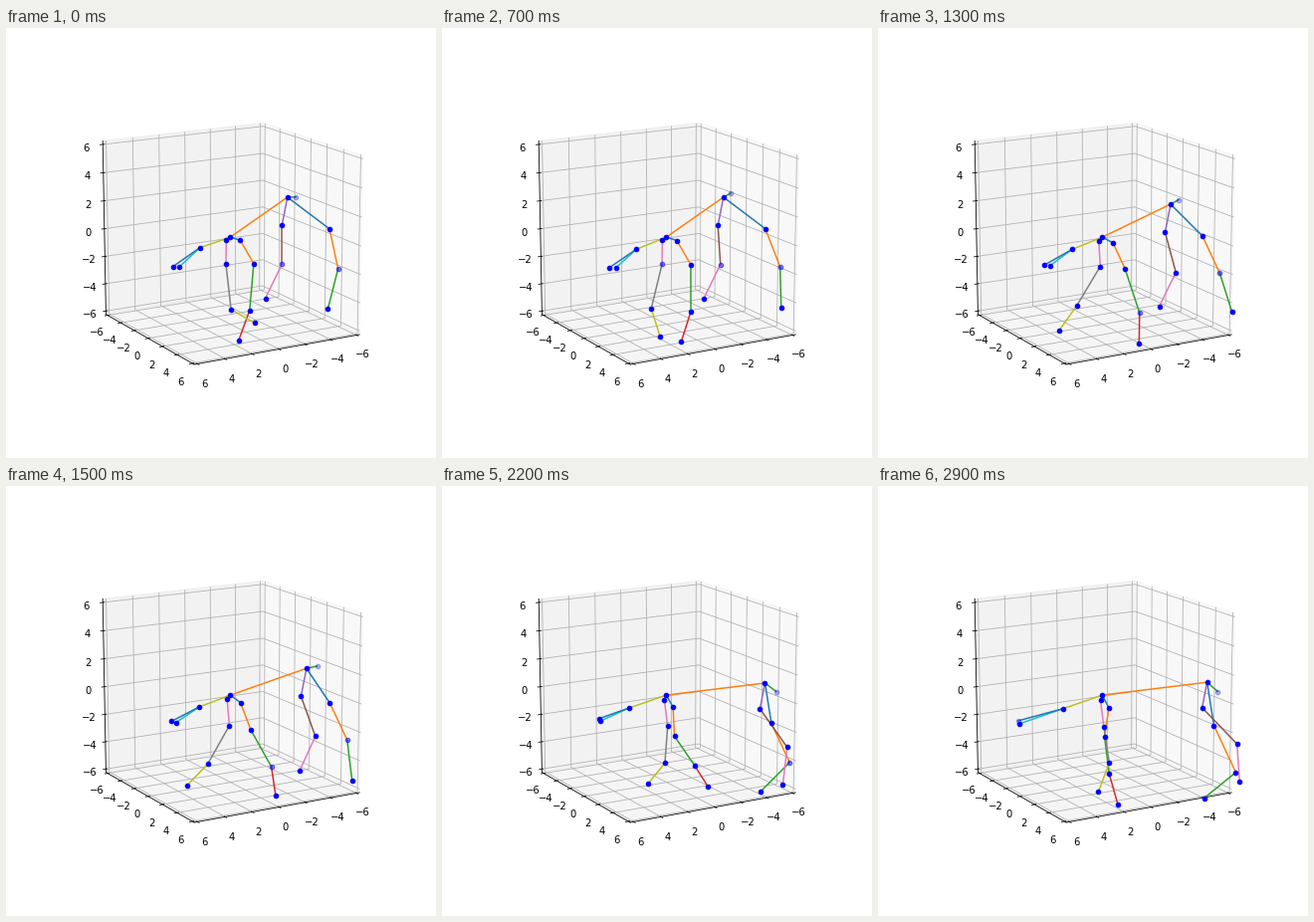
Animation, 432 px wide and 432 px high, one loop 3000 ms. Source, as a matplotlib script:

```python
import numpy as np
import matplotlib.pyplot as plt
from matplotlib.animation import FuncAnimation
from mpl_toolkits.mplot3d import proj3d

SIZE = 432
FRAMES = 30
STEP = np.arange(FRAMES)
LIM = 6.25


def ease(start, end, first, last):
    """Smooth change from start to end between two steps."""
    u = np.clip((STEP - first) / (last - first), 0, 1)
    return start + (end - start) * u * u * (3 - 2 * u)


def pulse(height, center, width):
    return height * np.exp(-0.5 * ((STEP - center) / width) ** 2)


class Bone:
    """Limb part hung from a parent; angle in degrees from straight down."""

    def __init__(self, parent, color, angle, length, behind=None):
        self.parent, self.color, self.behind = parent, color, behind
        self.leaf = True
        parent.leaf = False
        turn = np.radians(angle + 0 * STEP)
        self.path = parent.path + np.column_stack(
            [length * np.sin(turn), length * np.cos(turn)])

    def is_behind(self, n):
        return self.behind is not None and self.behind[0] <= n <= self.behind[1]


class Root:
    path = np.tile([225.4, 210.1], (FRAMES, 1))


root = Root()

# right front leg
shoulder_r = Bone(root, "C0", ease(72, 27, 8, 24), ease(10.5, 14.5, 0, 29))
elbow_r = Bone(shoulder_r, "C1", ease(30, -9, 8, 30), ease(27, 29, 0, 15))
wrist_r = Bone(elbow_r, "C2", ease(-5, 5, 0, 15) + pulse(38, 19, 4.2),
               ease(47, 38, 12, 20) - pulse(5, 19, 2.5), behind=(9, 16))
hand_r = Bone(wrist_r, "C3", ease(-20, 13, 4, 22) + pulse(20, 21, 4),
              32 - pulse(8, 20, 3.5))

# left front leg
shoulder_l = Bone(root, "C5", ease(-54, -22, 8, 24), 5)
elbow_l = Bone(shoulder_l, "C6", ease(-1, 7, 5, 20), ease(24, 27, 8, 16),
               behind=(2, 12))
wrist_l = Bone(elbow_l, "C7", 10 - pulse(41, 13.3, 6), ease(46, 37, 13, 20))
hand_l = Bone(wrist_l, "C8", ease(60, -45, 0, 16) + ease(0, 26, 18, 31),
              ease(27, 31, 0, 11) - pulse(6, 20, 2.5))

# head
neck = Bone(root, "C8", pulse(4, 10, 4) - 71, ease(32.5, 42, 12, 27))
ear_b = Bone(neck, "C9", ease(-47, -71, 4, 30), ease(28, 47, 19, 30))
ear_a = Bone(neck, "C0", ease(-55, -75, 4, 30),
             ease(33, 47, 20, 30) - pulse(4, 19, 3), behind=(23, 29))

# right hind leg
hip = Bone(root, "C1", ease(125, 97, 8, 21), ease(70, 106, 8, 27))
knee_r = Bone(hip, "C0", ease(53, 9, 10, 21),
              ease(53, 44, 6, 16) - pulse(5, 19, 3))
hock_r = Bone(knee_r, "C1", ease(12, 25, 0, 11), ease(41, 52, 19, 29),
              behind=(0, 27))
paw_r = Bone(hock_r, "C2", ease(-15, -51, 11, 24) + pulse(35, 12.5, 4.5), 41)

# left hind leg and tail
knee_l = Bone(hip, "C4", -11, ease(29, 26, 12, 25))
hock_l = Bone(knee_l, "C5", ease(0, 44, 2, 30), ease(39, 51, 5, 32),
              behind=(0, 12))
paw_l = Bone(hock_l, "C6", ease(-26, 4, 13, 28), 38)
tail = Bone(hip, "C2", ease(90, 49, 13, 24) + pulse(42, 10, 3.5),
            ease(8.5, 14.3, 11, 20), behind=(0, 29))

BONES = [shoulder_r, elbow_r, wrist_r, hand_r,
         shoulder_l, elbow_l, wrist_l, hand_l,
         neck, ear_b, ear_a,
         hip, knee_r, hock_r, paw_r,
         knee_l, hock_l, paw_l, tail]

fig = plt.figure(figsize=(6, 6), dpi=72, facecolor="white")
AX_X, AX_Y, AX_SIZE = 51, 47.5, 339
box = fig.add_axes([AX_X / SIZE, AX_Y / SIZE, AX_SIZE / SIZE, AX_SIZE / SIZE],
                   projection="3d")
box.set(xlim=(-LIM, LIM), ylim=(-LIM, LIM), zlim=(-LIM, LIM))
for axis in (box.xaxis, box.yaxis, box.zaxis):
    axis.set_ticks(range(-6, 7, 2))
box.set_box_aspect((1, 1, 1), zoom=0.91)
box.view_init(elev=15, azim=60)


def project(x, y, z):
    return proj3d.proj_transform(x * LIM, y * LIM, z * LIM, box.get_proj())[:2]


def view_range(a, b, pix_a, pix_b, start):
    """Limits that put values a and b at the given pixels."""
    unit = (b - a) / (pix_b - pix_a)
    low = a + (start - pix_a) * unit
    return low, low + AX_SIZE * unit


left, right = project(1, -1, -1)[0], project(-1, 1, -1)[0]
bottom, top = project(1, 1, -1)[1], project(-1, -1, 1)[1]
box.viewLim.intervalx = view_range(left, right, 100.4, 355.2, AX_X)
box.viewLim.intervaly = view_range(bottom, top, SIZE - 338, SIZE - 95.3, AX_Y)

stage = fig.add_axes([0, 0, 1, 1], zorder=5)
stage.set(xlim=(0, SIZE), ylim=(SIZE, 0))
stage.axis("off")

lines = [stage.plot([], [], color=bone.color, lw=1.5)[0] for bone in BONES]
far = stage.scatter([], [], s=21, color=[(0, 0, 1, 0.3)], zorder=4)
near = stage.scatter([], [], s=21, color=[(0, 0, 1, 1)], zorder=5)


def draw(n):
    solid, faint = [root.path[n]], []
    for line, bone in zip(lines, BONES):
        a, b = bone.parent.path[n], bone.path[n]
        line.set_data([a[0], b[0]], [a[1], b[1]])
        if bone.is_behind(n):
            # inner joints carry two overlaid dots
            faint += [b] if bone.leaf else [b, b]
        else:
            solid.append(b)
    far.set_offsets(faint)
    near.set_offsets(solid)
    return [*lines, far, near]


anim = FuncAnimation(fig, draw, frames=FRAMES, interval=100, repeat=True, blit=False)
plt.show()
```
